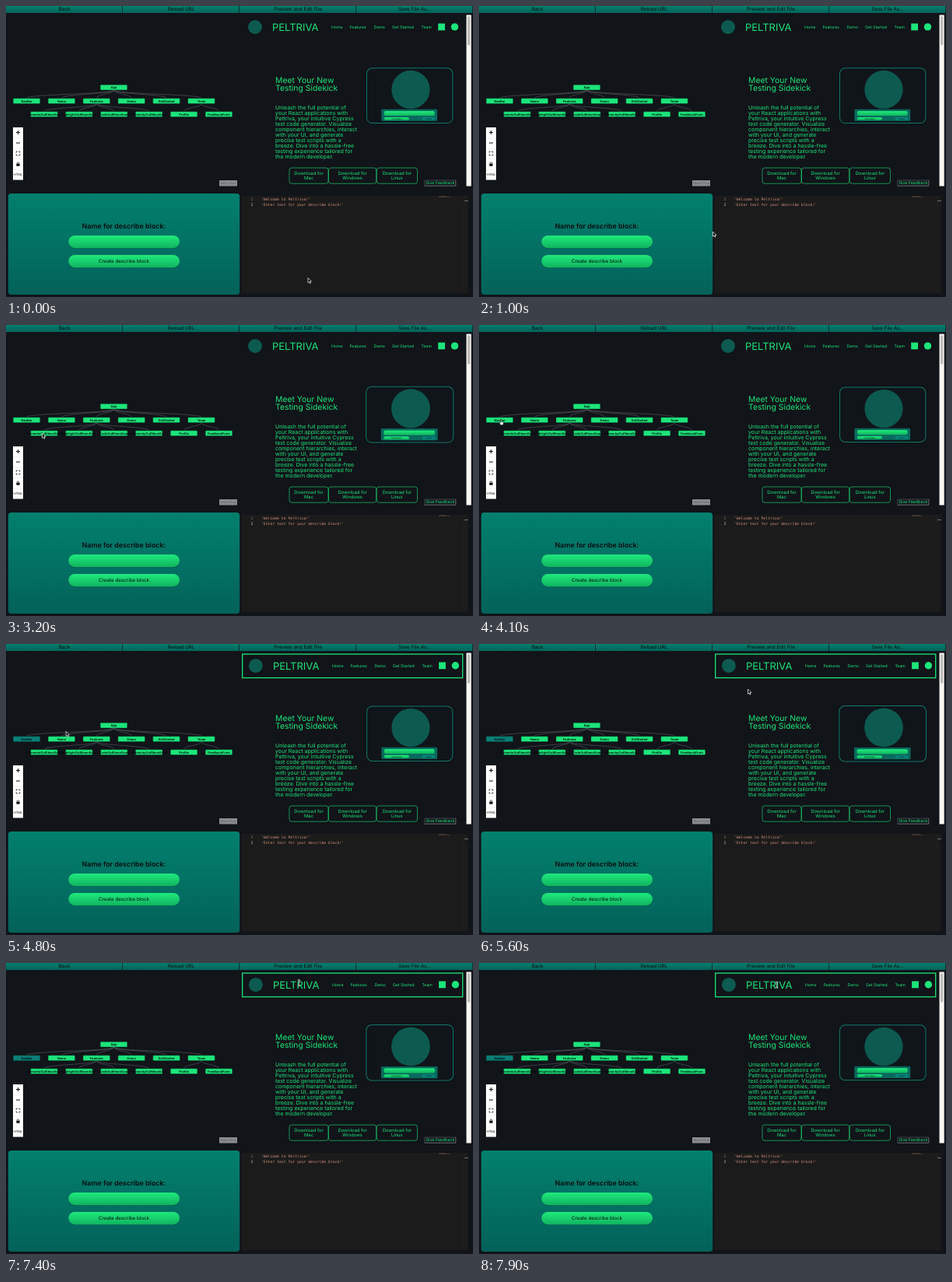
These frames come from a looping animation (600 by 374 pixels, 8 s). An HTML page:

```html
<!DOCTYPE html>
<html lang="en">
<head>
<meta charset="utf-8">
<title>Test sidekick</title>
<style>
html, body { margin: 0; width: 100%; height: 100%; overflow: hidden; background: #111419; }
svg { display: block; width: 100%; height: 100%; }
text { font-family: Inter, "Liberation Sans", sans-serif; white-space: pre; text-rendering: geometricPrecision; }
.mono { font-family: "DejaVu Sans Mono", "Liberation Mono", monospace; }
.mid { text-anchor: middle; }
.bold { font-weight: 600; }
</style>
</head>
<body>
<svg id="stage" viewBox="0 0 600 374">
  <defs>
    <linearGradient id="teal" x2="0" y2="1"><stop stop-color="#02806e"/><stop offset="1" stop-color="#03625a"/></linearGradient>
    <linearGradient id="pill" x2="0" y2="1"><stop stop-color="#1fea7c"/><stop offset="1" stop-color="#10b35f"/></linearGradient>
  </defs>
</svg>
<script>
const GREEN = '#1ce57a', DARK = '#040b0c', TEAL = '#0f7767';
const stage = document.getElementById('stage');

const text = (x, y, size, str, fill = GREEN, cls = '') =>
  `<text x="${x}" y="${y}" font-size="${size}" fill="${fill}" class="${cls}">${str}</text>`;
const rect = (x, y, w, h, fill, more = '') =>
  `<rect x="${x}" y="${y}" width="${w}" height="${h}" fill="${fill}" ${more}/>`;
const lines = (x, y, step, size, list, cls) =>
  list.map((s, i) => text(x, y + i * step, size, s, GREEN, cls)).join('');
const path = (d, stroke, width, more = '') =>
  `<path d="${d}" fill="none" stroke="${stroke}" stroke-width="${width}" ${more}/>`;

function topBar() {
  const names = ['Back', 'Reload URL', 'Preview and Edit File', 'Save File As...'];
  return names.map((s, i) =>
    rect(i * 150, 0, 149.3, 9, 'url(#teal)') + text(i * 150 + 75, 6.2, 6.3, s, DARK, 'mid')
  ).join('') + rect(300, 0, 149.3, 9, '#0b2b30', 'id="hover"');
}

function tree() {
  const node = (x, y, label, id = '') =>
    rect(x - 17.3, y + 0.2, 34.6, 6.8, GREEN, `rx="1" stroke="#0b3b28" stroke-width=".5" ${id}`) +
    text(x, y + 5, 4, label, DARK, 'mid bold');
  const edge = (x1, y1, x2, y2) => {
    const m = (y1 + y2) / 2;
    return path(`M${x1} ${y1}C${x1} ${m} ${x2} ${m} ${x2} ${y2}`, '#70757a', 0.45);
  };
  const row2 = ['NavBar', 'Home', 'Features', 'Demo', 'GetStarted', 'Team'];
  const row3 = ['ElementsOutfileonScan', 'HighlightOutfileonScan', 'CodeOutfileonScan',
    'HierarchyOutfileonScan', 'Profile', 'FeedbackForm'];
  const x2 = i => 26.5 + i * 44.9, x3 = i => 49 + i * 44.9;
  return row2.map((s, i) => edge(138.5, 108, x2(i), 118.5)).join('') +
    row3.map((s, i) => edge(x2(i < 4 ? 2 : 5), 125.5, x3(i), 135.5)).join('') +
    node(138.5, 101, 'App') +
    row2.map((s, i) => node(x2(i), 118.5, s, i ? '' : 'id="navNode"')).join('') +
    row3.map((s, i) => node(x3(i), 135.5, s)).join('');
}

function controls() {
  return rect(9, 156, 13, 67.5, '#fff') +
    [169.5, 183, 196.5, 210].map(y => rect(9, y, 13, 0.4, '#ddd')).join('') +
    path('M13 162.5h5M15.5 160v5M13 176h5', '#111', 1) +
    path('M13.2 188.6v-1.6h1.6M16.2 187h1.6v1.6M17.8 190.4v1.6h-1.6M14.8 192h-1.6v-1.6', '#111', 0.8) +
    rect(13.4, 202.8, 4.2, 3, '#111', 'rx=".5"') +
    path('M14.3 203v-1a1.2 1.2 0 0 1 2.4 0v1', '#111', 0.7) +
    text(15.5, 218.4, 4, 'HTML', '#111', 'mid') +
    rect(274, 224, 23, 7.5, '#8b8c8f') + text(285.5, 229.2, 3.9, 'React Flow', '#5d6064', 'mid');
}

function site() {
  const links = [[418, 'Home'], [441.5, 'Features'], [472.5, 'Demo'], [496, 'Get Started'], [533.5, 'Team']];
  const nav = `<g id="nav"><circle cx="320" cy="27" r="9" fill="#0d5a50"/>` +
    text(342, 32, 13, 'PELTRIVA') +
    links.map(([x, s]) => text(x, 29.1, 5.2, s)).join('') +
    rect(555.2, 22.5, 8.8, 8.8, GREEN) + `<circle cx="576.5" cy="26.9" r="4.7" fill="${GREEN}"/></g>` +
    rect(303.7, 13, 283, 30.5, 'none', `id="outline" stroke="${GREEN}" stroke-width="1.3"`);
  const card = `<g id="card">` +
    rect(463.7, 80, 110, 70.4, '#10151a', `rx="7" stroke="${TEAL}" stroke-width="1"`) +
    `<circle cx="520" cy="107.5" r="24.5" fill="#0d5a50"/>` +
    rect(482.5, 132.7, 71.5, 15, '#09695d', 'rx="1"') +
    rect(486, 135, 64.5, 6, 'url(#pill)', 'rx="2"') +
    rect(486, 142.8, 32, 3.8, 'url(#pill)', 'rx="1.9"') +
    rect(534.5, 142.8, 16.5, 3.8, '#06857a', 'rx="1.9"') +
    text(502, 145.5, 2.3, 'Create block', DARK, 'mid') +
    text(542.7, 145.5, 2.3, 'Cancel', DARK, 'mid') + `</g>`;
  const buttons = [[364, 50, 'Mac'], [414.5, 61.2, 'Windows'], [476.2, 52.3, 'Linux']].map(([x, w, os]) =>
    rect(x, 208, w, 20.2, 'none', `rx="3" stroke="${GREEN}" stroke-width=".6"`) +
    lines(x + w / 2, 217.2, 6.2, 5.9, ['Download for', os], 'mid')).join('');
  return nav + card + buttons +
    lines(346, 98.7, 10.6, 10.4, ['Meet Your New', 'Testing Sidekick']) +
    lines(346, 133.4, 6.97, 7, [
      'Unleash the full potential of', 'your React applications with', 'Peltriva, your intuitive Cypress',
      'test code generator. Visualize', 'component hierarchies, interact', 'with your UI, and generate',
      'precise test scripts with a', 'breeze. Dive into a hassle-free', 'testing experience tailored for',
      'the modern developer.']) +
    rect(537.8, 224, 40, 7.2, '#14181d') + path('M537.8 231.2V224h40', '#4c5055', 0.8) +
    path('M537.8 231.2h40V224', '#a0a4a6', 0.6) + text(557.8, 229.3, 5.3, 'Give Feedback', GREEN, 'mid') +
    rect(591.5, 11.5, 6.2, 220, '#faf7f3') + rect(593, 13, 3.2, 37.5, '#bdbcbb', 'rx="1.6"');
}

function form() {
  return rect(2.8, 241, 297.4, 130, 'url(#teal)', 'rx="4"') +
    text(151.5, 285.8, 8.9, 'Name for describe block:', DARK, 'mid bold') +
    [295, 320].map(y =>
      rect(80.5, y + 0.8, 142.5, 16.2, '#04574f', 'rx="8.1"') +
      rect(80.3, y, 142.7, 16.2, 'url(#pill)', 'rx="8.1"')).join('') +
    text(151.5, 330.4, 6.25, 'Create describe block', DARK, 'mid');
}

function editor() {
  return rect(303, 244, 291, 125, '#1c1b1b') +
    rect(588.5, 244, 0.4, 125, '#2c2b2b') + rect(589, 250, 5, 0.9, '#77777a') +
    rect(556, 244.2, 10, 0.5, '#65503f') + rect(556, 245.5, 14, 0.5, '#65503f') +
    text(314.5, 249.8, 4.75, '1', '#858585', 'mono') + text(314.5, 256.8, 4.75, '2', '#c6c6c6', 'mono') +
    text(328, 249.8, 4.77, "'Welcome to Peltriva!'", '#ce9178', 'mono') +
    text(328, 256.8, 4.77, "'Enter text for your describe block!'", '#ce9178', 'mono');
}

const pointers = {
  arrow: '<path d="M0 0V6.2L1.5 4.9 2.5 7.1 3.5 6.6 2.5 4.5H4.4Z" fill="#000" stroke="#fff" stroke-width=".7"/>',
  hand: '<path d="M-.6 0Q0-.8.6 0V2.4L3 3Q3.6 3.2 3.4 4.4L2.8 6.6H-.2L-2 4Q-1.8 3-.6 3.9Z" fill="#fff" stroke="#000" stroke-width=".5"/>',
  beam: path('M-1.6-3.5Q0-3.5 0-2.5Q0-3.5 1.6-3.5M0-2.5V2.5M-1.6 3.5Q0 3.5 0 2.5Q0 3.5 1.6 3.5', '#fff', 1.4) +
    path('M-1.4-3.5Q0-3.5 0-2.5Q0-3.5 1.4-3.5M0-2.5V2.5M-1.4 3.5Q0 3.5 0 2.5Q0 3.5 1.4 3.5', '#222', 0.6)
};

stage.insertAdjacentHTML('beforeend',
  topBar() + tree() + controls() + site() + form() + editor() +
  Object.entries(pointers).map(([id, shape]) => `<g id="${id}">${shape}</g>`).join(''));

const el = id => document.getElementById(id);
const parts = Object.fromEntries(
  ['hover', 'navNode', 'nav', 'outline', 'card', ...Object.keys(pointers)].map(id => [id, el(id)]));
const show = (node, on) => node.setAttribute('visibility', on ? 'visible' : 'hidden');
const clamp = v => Math.max(0, Math.min(1, v));

// time, x, y
const track = [[0, 388, 349.5], [400, 388, 349.5], [1000, 300.5, 290], [1300, 285, 275], [2000, 70, 156],
  [2200, 60, 150], [2900, 55, 147], [3700, 28, 122], [4600, 28, 122], [5400, 342, 60], [5600, 345.5, 58],
  [6100, 352, 50], [6500, 372, 5], [6700, 371, 6], [6800, 371, 23], [7300, 376, 25], [7900, 382.5, 28]];

function pointerAt(t) {
  const i = Math.max(1, track.findIndex(k => k[0] >= t));
  const [a, b] = [track[i - 1], track[i]];
  const p = clamp((t - a[0]) / (b[0] - a[0])), e = p * p * (3 - 2 * p);
  return [a[1] + (b[1] - a[1]) * e, a[2] + (b[2] - a[2]) * e];
}

function draw(now) {
  const t = Math.floor(now % 8000 / 100) * 100;
  const picked = t >= 4300;
  show(parts.outline, picked);
  parts.nav.setAttribute('transform', `translate(${picked ? 0.9 : 0} ${picked ? 0.9 : 0})`);
  parts.navNode.setAttribute('fill', picked ? '#0a7f78' : GREEN);

  const scale = 1 + 0.0135 * (1 - Math.cos((t - 500) / 4000 * 2 * Math.PI));
  parts.card.setAttribute('transform', `translate(518.7 115.2) scale(${scale}) translate(-518.7 -115.2)`);
  parts.hover.setAttribute('opacity', 0.85 * Math.min(clamp((t - 6400) / 200), clamp((7100 - t) / 300)));

  const [x, y] = pointerAt(t);
  const kind = t >= 6800 ? 'beam' : t >= 3700 && t <= 4600 ? 'hand' : 'arrow';
  for (const id in pointers) show(parts[id], id === kind);
  parts[kind].setAttribute('transform', `translate(${x} ${y})`);
  requestAnimationFrame(draw);
}
requestAnimationFrame(draw);
</script>
</body>
</html>
```
